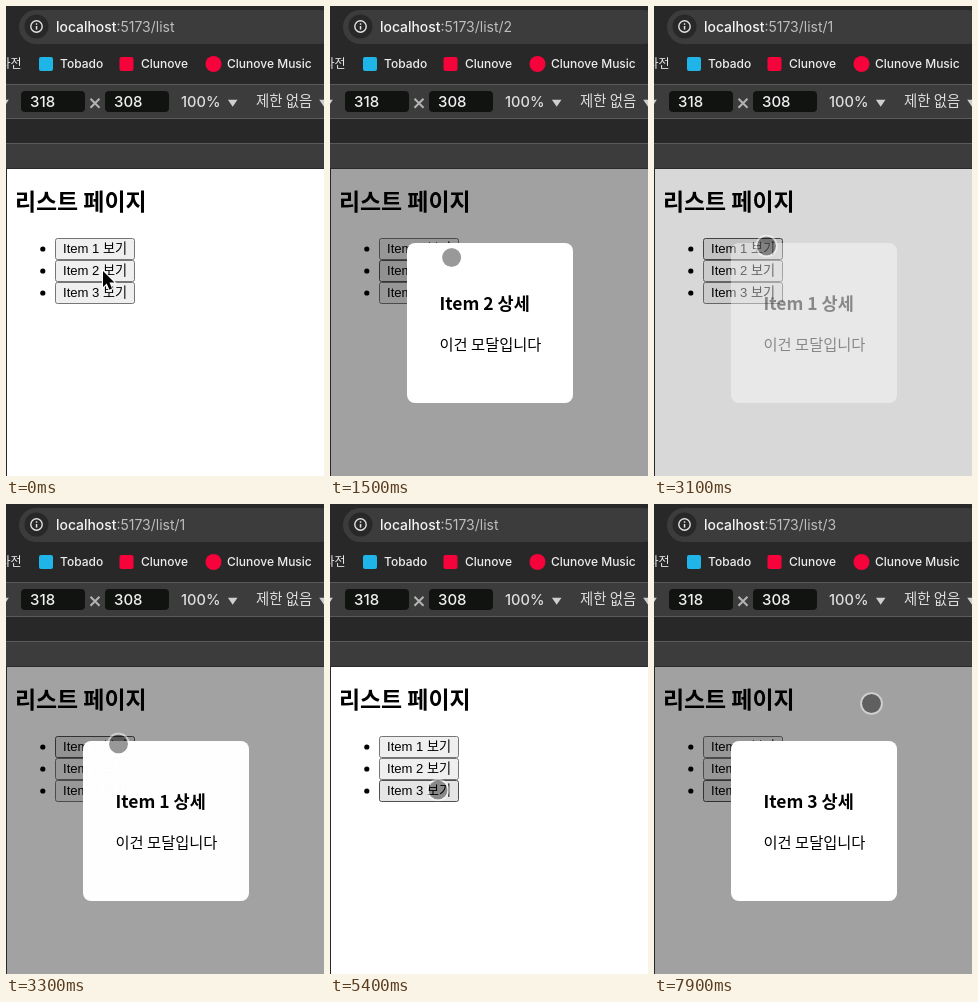
Animation of 318 by 470 pixels, one loop 8000 ms. Source, as an HTML page with a canvas:

```html
<!DOCTYPE html>
<html lang="ko">
<head>
<meta charset="utf-8">
<title>List modal</title>
<style>
  html, body { margin: 0; width: 100%; height: 100%; overflow: hidden; background: #282828; }
  canvas { display: block; width: 318px; height: 470px; }
</style>
</head>
<body>
<canvas id="stage"></canvas>
<script>
const W = 318, H = 470, LOOP = 8000, STEP = 100, FADE = 300;
const UI = 'Inter, "Noto Sans CJK KR", "Noto Sans CJK", sans-serif';
const KR = '"Noto Sans CJK KR", "Noto Sans CJK", sans-serif';
const FORM = '"Liberation Sans", "Noto Sans CJK KR", "Noto Sans CJK", sans-serif';

const canvas = document.getElementById('stage');
const ctx = canvas.getContext('2d');
const ratio = window.devicePixelRatio || 1;
canvas.width = W * ratio;
canvas.height = H * ratio;

// The button is lit from press to blur; the modal lives from open to close
const visits = [
  { item: 2, press: 100, open: 880, blur: 2100, close: 2100 },
  { item: 1, press: 2800, open: 3030, blur: 4500, close: 4700 },
  { item: 3, press: 5400, open: 5510, blur: LOOP, close: LOOP }
];

// The arrow becomes a touch pointer, which eases from stop to stop
const TOUCH = 700, HOME = { x: 97, y: 265 };
const moves = [
  { from: 1400, to: 1900, x: 179, y: 220 },
  { from: 2000, to: 2700, x: 112.5, y: 240 },
  { from: 3800, to: 4100, x: 182, y: 214.5 },
  { from: 4680, to: 5200, x: 108, y: 286 },
  { from: 5500, to: 5700, x: 166.5, y: 252.5 },
  { from: 5900, to: 6100, x: 233.5, y: 209.5 },
  { from: 6300, to: 6500, x: 223.5, y: 200.5 },
  { from: 6700, to: 6800, x: 219.5, y: 200 },
  { from: 7600, to: 7900, x: 217.5, y: 199.5 }
];

const clamp = k => Math.min(1, Math.max(0, k));
const easeOut = (k, power) => 1 - (1 - clamp(k)) ** power;

function rect(x, y, w, h, fill) {
  ctx.fillStyle = fill;
  ctx.fillRect(x, y, w, h);
}

function round(x, y, w, h, r, fill, stroke) {
  ctx.beginPath();
  ctx.roundRect(x, y, w, h, r);
  ctx.fillStyle = fill;
  ctx.fill();
  if (stroke) {
    ctx.strokeStyle = stroke;
    ctx.lineWidth = 1;
    ctx.stroke();
  }
}

function dot(x, y, r, fill) {
  ctx.beginPath();
  ctx.arc(x, y, r, 0, Math.PI * 2);
  ctx.fillStyle = fill;
  ctx.fill();
}

function ring(x, y, r, width, color) {
  ctx.beginPath();
  ctx.arc(x, y, r, 0, Math.PI * 2);
  ctx.lineWidth = width;
  ctx.strokeStyle = color;
  ctx.stroke();
}

function text(str, x, y, font, color) {
  ctx.font = font;
  ctx.fillStyle = color;
  ctx.fillText(str, x, y);
  return x + ctx.measureText(str).width;
}

function caret(x) {
  ctx.fillStyle = '#cfcfcf';
  ctx.fill(new Path2D(`M${x - 4.8} 93.8h9.6l-4.8 7z`));
}

function drawAddress(route) {
  rect(0, 0, W, 78, '#282828');
  round(13, 4, W, 34, 17, '#3c3c3c');
  dot(30.5, 20.5, 12, '#282828');
  ring(30.5, 20.5, 5.7, 1.4, '#e3e3e3');
  rect(29.8, 20, 1.5, 3.6, '#e3e3e3');
  rect(29.8, 17.3, 1.5, 1.5, '#e3e3e3');
  const x = text('localhost', 50, 25.5, `500 13.9px ${UI}`, '#f4f4f4');
  text(':5173' + route, x, 25.5, `14px ${UI}`, '#bdbdbd');
}

function drawBookmarks() {
  const label = (str, x) => text(str, x, 62, `500 12px ${UI}`, '#ececec');
  ctx.textAlign = 'right';
  label('사전', 15.5);
  ctx.textAlign = 'left';
  round(33, 51, 14, 14, 2, '#1fb5e8');
  label('Tobado', 54);
  round(113.5, 51, 14, 14, 2, '#f5033a');
  label('Clunove', 135);
  dot(207.5, 58, 8, '#f5033a');
  label('Clunove Music', 221);
}

function drawDeviceBar() {
  rect(0, 78, W, 85, '#3c3c3c');
  rect(0, 113, W, 24, '#282828');
  for (const y of [78, 112, 137]) rect(0, y, W, 1, '#5a5a5a');
  rect(0, 162, W, 1, '#2a2a2a');
  for (const [size, x] of [['318', 15], ['308', 99]]) {
    round(x, 85, 64, 21, 4, '#111311');
    text(size, x + 9, 101.3, `500 15px ${UI}`, '#f0f0f0');
  }
  ctx.lineWidth = 2;
  ctx.strokeStyle = '#b4b4b4';
  ctx.stroke(new Path2D('M84.5 92.7l9 9m0-9l-9 9'));
  text('100%', 175, 101.3, `500 14.6px ${UI}`, '#dedede');
  text('제한 없음', 250, 100, `500 14.4px ${KR}`, '#dedede');
  [-2, 226.7, 318].forEach(caret);
}

function drawPage(lit) {
  rect(0, 163, 1, H - 163, '#282828');
  rect(1, 163, W - 1, H - 163, '#fff');
  text('리스트 페이지', 9, 204, `bold 22.9px ${KR}`, '#000');
  for (let i = 1; i <= 3; i++) {
    const y = 210 + i * 22, on = i === lit;
    dot(36.8, y + 11, 2.6, '#000');
    round(49.5, y + .5, 79, 21, 2, on ? '#e5e5e5' : '#efefef', on ? '#4f4f4f' : '#767676');
    text(`Item ${i} 보기`, 57, y + 15.3, `13.1px ${FORM}`, '#000');
  }
}

function drawModal(item, alpha) {
  ctx.globalAlpha = alpha;
  rect(1, 163, W - 1, H - 163, 'rgba(0,0,0,.37)');
  round(77, 237, 166, 160, 8, '#fff');
  text(`Item ${item} 상세`, 109.5, 304, `bold 17.5px ${KR}`, '#000');
  text('이건 모달입니다', 109.5, 343.5, `15.3px ${KR}`, '#000');
  ctx.globalAlpha = 1;
}

function drawArrow({ x, y }) {
  const shape = new Path2D(`M${x} ${y}v16l3.7-3.4 2.7 6.1 2.6-1.1-2.5-6h5z`);
  ctx.lineWidth = 2;
  ctx.strokeStyle = '#fff';
  ctx.stroke(shape);
  ctx.fillStyle = '#000';
  ctx.fill(shape);
}

function drawTouch(t) {
  let { x, y } = HOME;
  for (const m of moves) {
    const k = easeOut((t - m.from) / (m.to - m.from), 1.6);
    x += (m.x - x) * k;
    y += (m.y - y) * k;
  }
  dot(x, y, 9.6, 'rgba(0,0,0,.4)');
  ring(x, y, 10.4, 1.9, 'rgba(255,255,255,.5)');
}

function draw(now) {
  const t = Math.floor((now % LOOP) / STEP) * STEP;
  const lit = visits.find(v => t >= v.press && t < v.blur);
  const shown = visits.find(v => t >= v.open && t < v.close);
  ctx.setTransform(ratio, 0, 0, ratio, 0, 0);
  drawAddress('/list' + (shown ? '/' + shown.item : ''));
  drawBookmarks();
  drawDeviceBar();
  drawPage(lit?.item);
  if (shown) drawModal(shown.item, easeOut((t - shown.open) / FADE, 2));
  if (t < TOUCH) drawArrow(HOME);
  else drawTouch(t);
}

let start;
function tick(now) {
  start ??= now;
  draw(now - start);
  requestAnimationFrame(tick);
}
requestAnimationFrame(tick);
</script>
</body>
</html>
```
